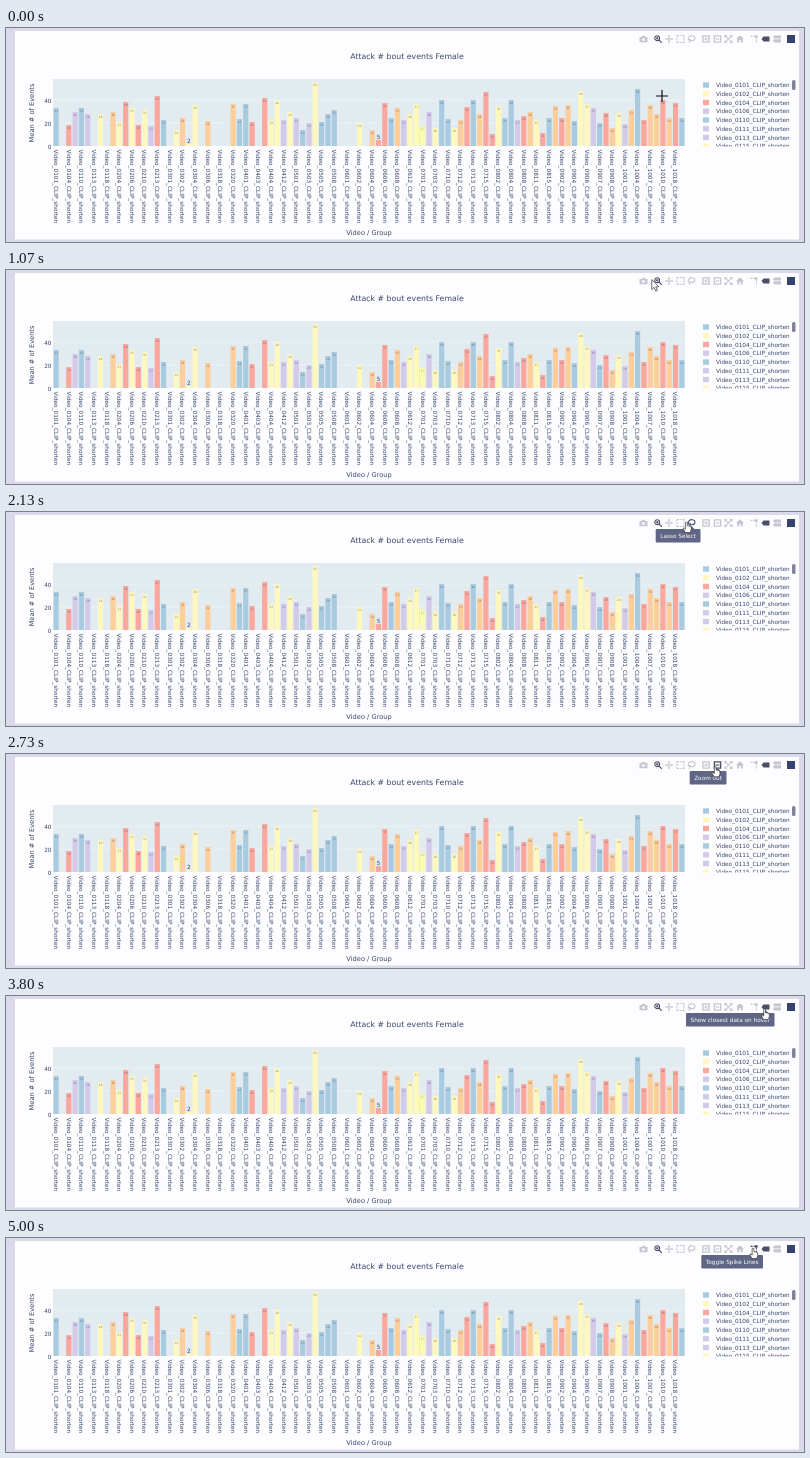
Write an HTML page that moves like this. It is 798 px wide and 214 px high and loops after 5070 ms.

```html
<!DOCTYPE html>
<html lang="en">
<head>
<meta charset="utf-8">
<title>Bar chart toolbar</title>
<style>
  html, body { margin: 0; width: 100%; height: 100%; overflow: hidden; background: #dad9ea; }
  svg { display: block; width: 798px; height: 214px; }
  text { font: 5.76px "DejaVu Sans", Verdana, sans-serif; fill: #38456a; }
  .title { font-size: 7.8px; }
  .axis { font-size: 6.65px; }
  .value { font-size: 3px; opacity: .6; }
  .icon { fill: none; stroke: #c6c6d2; stroke-width: 1.1; }
  .icon .solid { fill: #c6c6d2; stroke: none; }
  .icon.on { stroke: #4d5068; }
  .icon.on .solid { fill: #4d5068; }
  #tip rect, #tip path { fill: #5f6584; }
  #tip text { fill: #fff; }
</style>
</head>
<body>
<svg id="stage" viewBox="0 0 798 214">
  <defs>
    <clipPath id="legendClip"><rect x="690" y="51" width="108" height="67.5"/></clipPath>
  </defs>
  <rect x="9" y="3" width="784" height="208.5" fill="#fdfdff"/>
  <rect x="47" y="51" width="632" height="67" fill="#e2ebf0"/>
  <path d="M47 72H679M47 95H679" stroke="#f3f6fa" stroke-width=".6"/>
  <g id="bars"></g>
  <g id="labels"></g>
  <text class="title" x="401" y="31" text-anchor="middle">Attack # bout events Female</text>
  <text class="axis" x="363" y="207" text-anchor="middle">Video / Group</text>
  <text class="axis" transform="translate(28 85) rotate(-90)" text-anchor="middle">Mean # of Events</text>
  <g text-anchor="end">
    <text x="45.5" y="74.5">40</text>
    <text x="45.5" y="97.5">20</text>
    <text x="45.5" y="120.5">0</text>
  </g>
  <g id="legend" clip-path="url(#legendClip)"></g>
  <rect x="786" y="52" width="3.5" height="10" rx="1.5" fill="#808498"/>
  <g id="icons"></g>
  <rect x="781" y="7" width="8" height="8" fill="#34446a"/>
  <g id="tip"><path/><rect y="17" height="13.5" rx="1"/><text y="25.8" text-anchor="end"></text></g>
  <g id="cursor">
    <path id="cross" d="M-6 0H6M0-6V6" stroke="#111" stroke-width="1.2"/>
    <path id="arrow" d="M0 0V10L2.3 7.8 4 11.5 5.6 10.8 4 7.2H7Z" fill="#fff" stroke="#333" stroke-width=".7"/>
    <path id="hand" transform="scale(.88)" d="M-1 .6Q0-.6 1 .6V4.2L2.4 4.4 4 4.8 5.4 5.5V8.5L4.4 12H-1.2L-3.6 7.8Q-3.8 6.4-2.6 6.8L-1 8Z" fill="#fff" stroke="#333" stroke-width=".8"/>
  </g>
</svg>
<script>
const $ = id => document.getElementById(id);

function add(parent, tag, attrs, text) {
  const el = document.createElementNS('http://www.w3.org/2000/svg', tag);
  for (const key in attrs) el.setAttribute(key, attrs[key]);
  if (text !== undefined) el.textContent = text;
  parent.appendChild(el);
  return el;
}

// Blue, yellow, red, orange, lavender.
const colors = { b: '#a9cbdf', y: '#fff8bd', r: '#fba79d', o: '#fdcd9a', l: '#d3c9e9' };
const pitch = 6.32, base = 118, unit = 1.15;

// One entry per category: colour letter and bar height in pixels.
const bars = `b38 - r21 l34 b38 l32 - y32 - o34 y24 r44 y38 r21 y36 l20 r50 b26 - y16
  o28 y2 y41 - o25 - - - o42 b27 b42 r24 - r48 y26 y46 l26 y34 l28 b16
  l23 y64 b24 b32 b36 - - - y23 - o16 r6 r43 b28 o38 l26 y32 y42 y20 l34
  y18 b46 b27 y18 o26 r39 b46 o32 r54 r12 y40 b28 b46 l26 r30 o34 y26 r13 b28 o40
  r28 o41 b25 y55 y42 l38 b23 r33 o18 y33 l22 o36 b57 r26 o41 o32 r46 o28 r43 b28`.split(/\s+/);

bars.forEach((bar, i) => {
  if (bar === '-') return;
  const h = +bar.slice(1), x = 47 + pitch * (i + .5), small = h < 10;
  add($('bars'), 'rect', { x: x - 2.6, y: base - h, width: 5.2, height: h, fill: colors[bar[0]] });
  add($('bars'), 'text', {
    x, y: small ? base - h - 1.5 : base - h + 3.6, 'text-anchor': 'middle',
    class: small ? '' : 'value'
  }, Math.round(h / unit));
});

const clip = code => `Video_${code}_CLIP_shorten`;

// Clip numbers shown under the axis, grouped by their first two digits.
const groups = ['01 04 10 13 18', '04 06 10 13', '01 02 04 06 18 20', '01 03 04 12', '01 03 05 08',
  '01 02 04 06 08 12', '01 03 10 12 13 15', '02 04 08 11 15', '02 04 06 07 08', '01 04 07 10 18'];
groups.flatMap((list, i) => list.split(' ').map(n => String(i + 1).padStart(2, '0') + n))
  .forEach((code, i) => add($('labels'), 'text', {
    transform: `translate(${48 + i * pitch * 2} 121.5) rotate(90)`
  }, clip(code)));

'b0101 y0102 r0104 l0106 b0110 l0111 l0113 y0115'.split(' ').forEach((item, i) => {
  const y = 57 + i * 8.75;
  add($('legend'), 'rect', { x: 697, y: y - 2.7, width: 6, height: 5.4, fill: colors[item[0]] });
  add($('legend'), 'text', { x: 710, y: y + 2.2 }, clip(item.slice(1)));
});

// Toolbar: centre, tooltip, outline path, filled path.
const tools = [
  [637.5, 'Download plot', 'M-1.5 .5A1.6 1.6 0 1 0 1.5 .5A1.6 1.6 0 1 0-1.5 .5', 'M-4-2H-2L-1-3.3H1L2-2H4V3.3H-4ZM-2 .6A2 2 0 0 0 2 .6A2 2 0 0 0-2 .6Z'],
  [652, 'Zoom', 'M-3.2-.8A2.4 2.4 0 1 0 1.6-.8A2.4 2.4 0 1 0-3.2-.8M1 1L3.8 3.8M-2-.8H.4M-.8-2V.4', ''],
  [663, 'Pan', 'M-3 0H3M0-3V3', 'M0-4.2L1.5-2.5H-1.5ZM0 4.2L1.5 2.5H-1.5ZM-4.2 0L-2.5-1.5V1.5ZM4.2 0L2.5-1.5V1.5Z'],
  [674.5, 'Box Select', 'M-3.5-1.5V-3.5H-1.5M-.7-3.5H.9M1.7-3.5H3.5V-1.5M3.5-.7V.9M3.5 1.7V3.5H1.7M.9 3.5H-.7M-1.5 3.5H-3.5V1.7M-3.5 .9V-.7', ''],
  [685.5, 'Lasso Select', 'M-2.4 1.5C-5-1.5-1-3.8 1-3.2C5-2.4 3.8 1.8 0 1.8C-2.5 1.8-2.5-.3-1 1L-2.4 3.8', ''],
  [700, 'Zoom in', 'M-1.8 0H1.8M0-1.8V1.8', 'M-3.8-3.8H3.8V3.8H-3.8ZM-2.4-2.4V2.4H2.4V-2.4Z'],
  [711.5, 'Zoom out', 'M-1.8 0H1.8', 'M-3.8-3.8H3.8V3.8H-3.8ZM-2.4-2.4V2.4H2.4V-2.4Z'],
  [722.5, 'Autoscale', 'M-3.2-3.2L3.2 3.2M3.2-3.2L-3.2 3.2M-3.5-1.5V-3.5H-1.5M1.5-3.5H3.5V-1.5M3.5 1.5V3.5H1.5M-1.5 3.5H-3.5V1.5', ''],
  [734, 'Reset axes', '', 'M0-3.8L4 0H2.8V3.5H.8V1H-.8V3.5H-2.8V0H-4Z'],
  [748, 'Toggle Spike Lines', 'M-3.5-2.6H-1.5M-.5-2.6H1M2.4-1V.5M2.4 1.6V3.4', 'M1-3.8H3.6V-1.2H1Z'],
  [759.5, 'Show closest data on hover', '', 'M-4 0L-2-2.4H4V2.4H-2Z'],
  [771, 'Compare data on hover', '', 'M-4-1.8L-2.8-3.4H4V-.4H-2.8ZM-4 1.8L-2.8 .3H4V3.4H-2.8Z']
];
const active = [1, 10];
const icons = tools.map(([x, , line, solid]) => {
  const g = add($('icons'), 'g', { transform: `translate(${x} 11)` });
  add(g, 'path', { d: solid, class: 'solid', 'fill-rule': 'evenodd' });
  add(g, 'path', { d: line });
  return g;
});

// Pointer path: time in ms, x, y.
const path = [
  [0, 656, 68], [600, 637, 9], [900, 638, 9], [1200, 652, 10], [1470, 656, 10],
  [2130, 683, 10], [2270, 687, 11], [3330, 746, 14.5], [3500, 749, 14], [3700, 758, 13],
  [4200, 767, 12.5], [4530, 768, 12], [4930, 747, 10], [5070, 746, 10]
];
const loop = 5070, frame = loop / 76;

function pointerAt(t) {
  const i = path.findIndex(p => p[0] > t);
  const [t0, x0, y0] = path[i - 1], [t1, x1, y1] = path[i];
  const k = (t - t0) / (t1 - t0);
  return [x0 + (x1 - x0) * k, y0 + (y1 - y0) * k];
}

const show = (el, on) => { el.style.display = on ? '' : 'none'; };
const tip = $('tip'), [tipArrow, tipBox, tipText] = tip.children;

function setTip(index) {
  show(tip, index >= 0);
  if (index < 0) return;
  const [x, label] = tools[index], right = x + 9;
  tipText.textContent = label;
  tipText.setAttribute('x', right - 4.5);
  const width = tipText.getComputedTextLength() + 9;
  tipBox.setAttribute('x', right - width);
  tipBox.setAttribute('width', width);
  tipArrow.setAttribute('d', `M${x - 3} 17L${x} 14L${x + 3} 17Z`);
}

function draw(now) {
  const t = Math.floor((now % loop) / frame + .001) * frame % loop;
  const [x, y] = pointerAt(t);
  const hover = y < 18 ? tools.findIndex(tool => Math.abs(tool[0] - x) <= 5.8) : -1;
  icons.forEach((g, i) => g.setAttribute('class', i === hover || active.includes(i) ? 'icon on' : 'icon'));
  setTip(hover);
  show($('cross'), y > 51);
  show($('arrow'), y <= 51 && hover < 0);
  show($('hand'), hover >= 0);
  $('cursor').setAttribute('transform', `translate(${x.toFixed(1)} ${y.toFixed(1)})`);
}

const start = performance.now();
function tick() {
  draw(performance.now() - start);
  requestAnimationFrame(tick);
}
tick();
</script>
</body>
</html>
```
